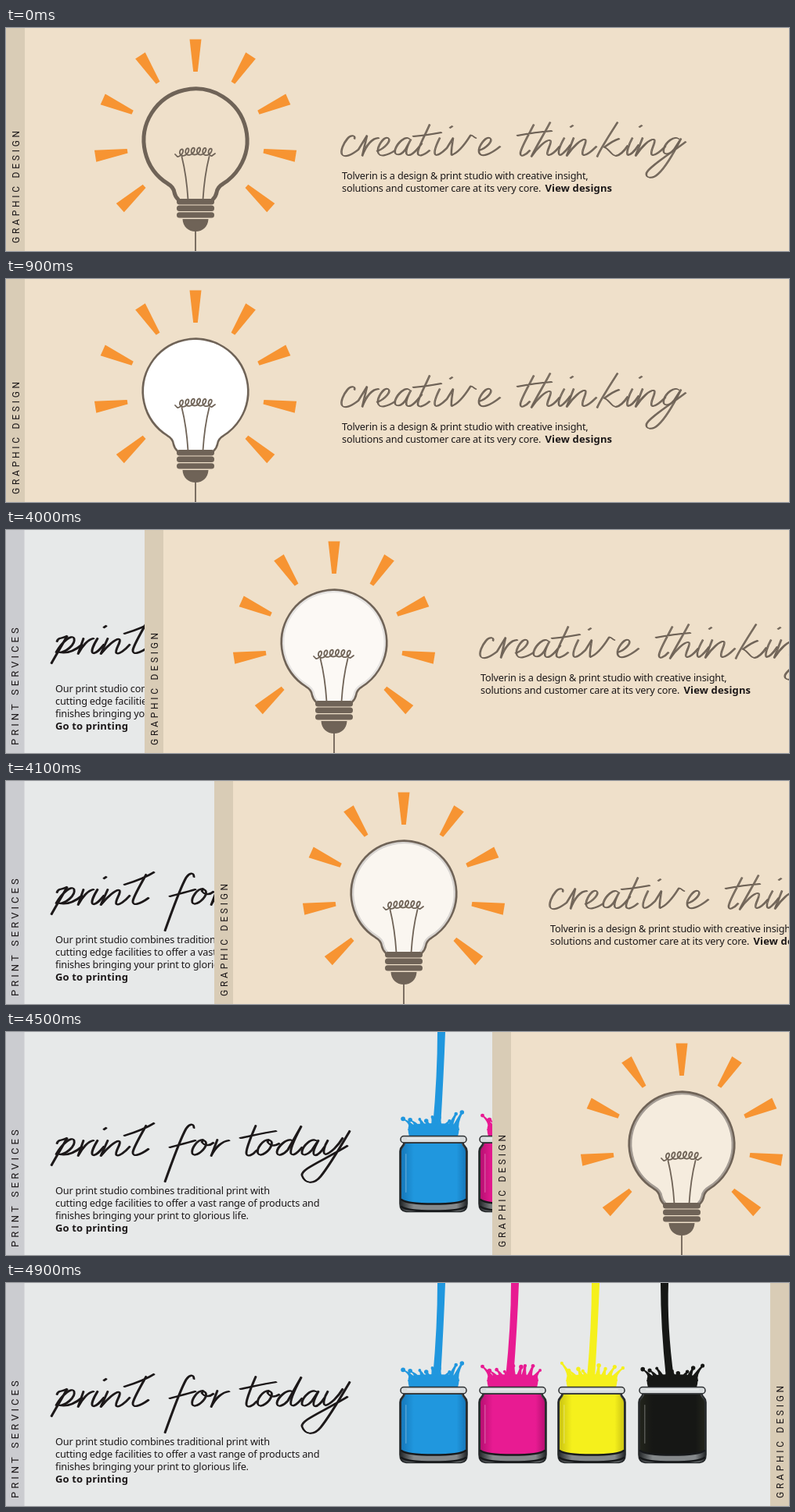
Recreate the animation shown at these times as an HTML page with a canvas. Size 1000 by 286 pixels, loop 8000 ms.

```html
<!DOCTYPE html>
<html lang="en">
<head>
<meta charset="utf-8">
<title>Studio banner</title>
<style>
  html, body { margin: 0; width: 100%; height: 100%; overflow: hidden; background: #e7e9e9; }
  canvas { display: block; width: 1000px; height: 286px; }
</style>
</head>
<body>
<canvas id="stage"></canvas>
<script>
const W = 1000, H = 286, LOOP = 8000, STEP = 100;
const SLIDE = 976, SLIDE_STEPS = 11;
const BROWN = '#6f6357', INK = '#1b1718', ORANGE = '#f79432';

const canvas = document.getElementById('stage');
const ctx = canvas.getContext('2d');
const scale = window.devicePixelRatio || 1;
canvas.width = W * scale;
canvas.height = H * scale;

// Pen strokes of the handwritten headings
const creative = new Path2D(`M445 142C447 137 440 137 436 142C431 148 427 157 429 162C432 167 441 163 450 156
  L461 138L455 164C460 150 468 141 476 141M474 158C484 154 493 144 488 141C482 139 474 152 475 159C476 167 488 163 497 157
  M515 142C510 138 500 147 497 156C495 165 504 164 510 156L517 143C512 152 509 161 513 163C518 164 526 155 531 148
  M541 124C535 138 527 152 526 159C525 167 534 163 541 157M520 139C533 138 545 136 556 134
  M554 141C550 149 546 158 548 162C550 165 557 160 563 154L571 141C570 149 568 159 569 163C578 160 588 146 593 138C595 136 597 140 600 141
  M567 128L570 126M604 157C614 154 623 144 618 141C612 139 603 152 604 159C606 168 620 161 631 152`);
const thinking = new Path2D(`M674 124C666 140 658 153 657 160C656 167 664 163 669 157M653 138C668 135 682 133 697 132
  M695 121C686 138 675 156 671 165C678 154 690 143 695 144C699 146 688 160 692 163C696 164 702 158 707 152
  M713 141C708 150 704 160 707 163C711 163 716 156 721 150M721 127L724 125
  M725 141L716 164C724 152 735 142 740 143C743 146 733 159 737 163C741 164 748 158 754 152`);
const thinkingEnd = new Path2D(`M781 121C771 137 759 155 755 165M783 142C776 144 768 150 764 153C770 154 773 164 779 164C785 163 790 157 794 151
  M800 141C795 150 792 160 794 163C799 163 804 156 808 150M809 127L812 125
  M813 141L804 164C812 152 822 142 828 143C831 146 821 159 825 163C829 164 836 158 842 152
  M859 142C853 138 843 146 840 155C838 164 847 163 853 156L862 142C853 160 843 178 833 187C826 194 816 193 818 186C821 178 850 160 868 146`);
const printFor = new Path2D(`M65 143C67 137 71 140 78 136C72 147 64 160 58 171M64 157C72 143 84 133 87 139C89 147 76 157 68 157C79 159 90 153 97 147
  M99 139L92 159C97 149 105 140 112 139M117 139C112 147 108 156 111 158C115 159 120 153 125 147M125 125L128 123
  M130 139L121 159C129 149 140 139 145 140C148 143 138 154 141 158C144 160 152 154 158 147
  M179 120C171 134 163 148 162 154C161 161 171 158 182 150M151 133C164 129 178 124 189 117`);
const printForEnd = new Path2D(`M240 123C240 117 235 117 230 124C222 138 212 167 203 192M209 148C220 145 232 142 242 139
  M252 138C244 138 236 150 238 156C241 161 252 153 255 146C257 140 252 137 250 141C254 147 260 146 265 142M270 138L262 159C267 148 276 140 285 139`);
const today = new Path2D(`M319 120C313 134 306 150 307 156C308 161 315 158 320 152M299 136C314 133 330 129 345 127
  M336 138C328 138 319 150 322 156C326 161 337 152 339 145C341 139 335 137 334 141C338 147 344 146 349 143
  M366 139C358 136 347 147 346 154C346 161 355 157 360 151L377 121C369 136 362 151 364 156C367 160 373 154 378 148
  M396 139C390 136 380 145 378 153C377 161 386 157 391 151L399 139C394 148 391 156 394 158C398 159 403 153 407 147
  M411 139C406 147 404 156 408 157C415 155 424 146 430 136M439 127C429 144 414 170 402 185C393 196 382 195 378 184C376 176 405 165 436 146`);

const glass = new Path2D(`M-38 142C-38 147 -43 146 -43 153L-43 220Q-43 230 -35 230.5L35 230.5Q43 230 43 220L43 153C43 146 38 147 38 142Z`);
const paint = new Path2D(`M-36 143L36 143C37 148 41 148 41 154L41 214Q34 220 0 220Q-34 220 -41 214L-41 154C-41 148 -37 148 -36 143Z`);

// Bulb outline, relative to its centre
const bulb = new Path2D();
const neck = Math.atan2(56, 35);
bulb.moveTo(-22, 76);
bulb.quadraticCurveTo(-26, 72, -27, 67);
bulb.quadraticCurveTo(-28, 60, -35, 56);
bulb.arc(0, 0, 66, Math.PI - neck, neck);
bulb.quadraticCurveTo(28, 60, 27, 67);
bulb.quadraticCurveTo(26, 72, 22, 76);

const clamp = (v, lo, hi) => Math.min(hi, Math.max(lo, v));
const stepsSince = (t, start, max) => clamp(Math.floor((t - start) / STEP) + 1, 0, max);

function rect(x, y, w, h, color, r = 0) {
  ctx.fillStyle = color;
  ctx.beginPath();
  ctx.roundRect(x, y, w, h, r);
  ctx.fill();
}

function text(str, x, y, font, spacing) {
  ctx.font = font;
  ctx.letterSpacing = spacing + 'px';
  ctx.fillStyle = INK;
  ctx.fillText(str, x, y);
}

const body = (str, x, y) => text(str, x, y, '12.7px "Noto Sans", sans-serif', -0.18);
const bold = (str, x, y) => text(str, x, y, 'bold 13px "Noto Sans", sans-serif', 0.15);

function tab(label, width, color, baseline, size, spacing) {
  rect(0, 0, width, H, color);
  ctx.save();
  ctx.translate(baseline, 276);
  ctx.rotate(-Math.PI / 2);
  text(label, 0, 0, size + 'px Roboto, sans-serif', spacing);
  ctx.restore();
}

// Two shifted passes give a broad-nib line
function handwrite(paths, color, width) {
  ctx.strokeStyle = color;
  ctx.lineWidth = width;
  for (const shift of [-0.6, 0.6]) {
    ctx.save();
    ctx.translate(shift, shift * 0.4);
    paths.forEach(p => ctx.stroke(p));
    ctx.restore();
  }
}

function drawRays() {
  ctx.fillStyle = ORANGE;
  for (let k = -4; k <= 4; k++) {
    ctx.save();
    ctx.rotate(k * 33 * Math.PI / 180);
    ctx.beginPath();
    ctx.moveTo(-7.5, -129.5);
    ctx.lineTo(7.5, -129.5);
    ctx.lineTo(2.8, -88);
    ctx.lineTo(-2.8, -88);
    ctx.fill();
    ctx.restore();
  }
}

function drawFilament() {
  ctx.lineWidth = 1.8;
  ctx.beginPath();
  for (const s of [-1, 1]) {
    ctx.moveTo(s * 17.5, 21);
    ctx.quadraticCurveTo(s * 11.5, 45, s * 9.5, 76);
  }
  // Cursive loops along a gentle arch
  const loops = 6, n = 180;
  ctx.moveTo(-26, 18);
  for (let i = 0; i <= n; i++) {
    const u = i / n, a = u * loops * 2 * Math.PI;
    const lift = 4.5 * Math.cos(a);
    const x = -22 + 44 * u + 3.6 * Math.sin(a) - 0.25 * lift;
    const y = 16.5 - 2 * Math.sin(Math.PI * u) - u + lift;
    ctx.lineTo(x, y);
  }
  ctx.lineTo(25, 17);
  ctx.stroke();
}

function drawBulb(light) {
  ctx.save();
  ctx.translate(242, 144);
  drawRays();
  ctx.strokeStyle = BROWN;
  ctx.lineWidth = 5;
  ctx.stroke(bulb);
  ctx.fillStyle = `rgba(255,255,255,${light})`;
  ctx.fill(bulb);
  drawFilament();
  for (let i = 0; i < 3; i++) rect(-24, 75 + i * 8.6, 48, 7.4, BROWN, 3.5);
  ctx.fillStyle = BROWN;
  ctx.beginPath();
  ctx.moveTo(-16.5, 101);
  ctx.lineTo(16.5, 101);
  ctx.bezierCurveTo(16, 111, 9, 117, 0, 117);
  ctx.bezierCurveTo(-9, 117, -16, 111, -16.5, 101);
  ctx.fill();
  rect(-0.9, 116, 1.8, 28, BROWN);
  ctx.restore();
}

function random(seed) {
  return () => (seed = (seed * 16807) % 2147483647) / 2147483647;
}

function drawSplash(seed) {
  const rnd = random(seed * 7919);
  ctx.beginPath();
  ctx.moveTo(-31, 134);
  ctx.quadraticCurveTo(-34, 124, -31, 119);
  ctx.quadraticCurveTo(0, 115, 31, 119);
  ctx.quadraticCurveTo(34, 124, 31, 134);
  ctx.fill();
  for (let f = -1; f <= 1; f += 0.25) {
    const x = f * 27, tipX = f * 37 + rnd() * 6 - 3;
    const tipY = 111 - Math.abs(f) * 5 + rnd() * 12 - 6;
    ctx.beginPath();
    ctx.moveTo(x - 6, 126);
    ctx.quadraticCurveTo(x - 1, 118, tipX - 1.4, tipY);
    ctx.lineTo(tipX + 1.4, tipY);
    ctx.quadraticCurveTo(x + 3, 118, x + 6, 126);
    ctx.fill();
    ctx.beginPath();
    ctx.arc(tipX, tipY, 1.8 + rnd() * 1.2, 0, 2 * Math.PI);
    ctx.fill();
  }
}

function drawStream(top, foot) {
  ctx.beginPath();
  ctx.moveTo(top - 5, 0);
  ctx.quadraticCurveTo(top - 5, 55, foot - 5, 122);
  ctx.lineTo(foot + 5, 122);
  ctx.quadraticCurveTo(top + 3, 55, top + 5, 0);
  ctx.fill();
}

function sideGradient(edge, middle) {
  const g = ctx.createLinearGradient(-42, 0, 42, 0);
  g.addColorStop(0, edge);
  g.addColorStop(0.2, middle);
  g.addColorStop(0.85, middle);
  g.addColorStop(1, edge);
  return g;
}

function drawJar({ x, color, shade, top, foot }, i) {
  ctx.save();
  ctx.translate(x, 0);
  ctx.fillStyle = color;
  drawStream(top, foot);
  drawSplash(i + 3);

  ctx.fillStyle = sideGradient('#26292b', '#85898b');
  ctx.fill(glass);
  ctx.fillStyle = sideGradient(shade, color);
  ctx.fill(paint);
  ctx.strokeStyle = '#25282a';
  ctx.lineWidth = 1.6;
  ctx.stroke(glass);

  // Dark rings of the thick base
  ctx.strokeStyle = '#17191b';
  ctx.lineWidth = 2.4;
  ctx.beginPath();
  for (const y of [215, 224]) {
    ctx.moveTo(-41, y);
    ctx.quadraticCurveTo(-34, y + 5.5, 0, y + 5.5);
    ctx.quadraticCurveTo(34, y + 5.5, 41, y);
  }
  ctx.stroke();

  // Clear rim
  rect(-42, 133.5, 84, 8.5, 'rgba(205,210,212,.55)', 4);
  ctx.strokeStyle = '#2b2e30';
  ctx.lineWidth = 1.5;
  ctx.stroke();
  rect(-34, 136, 68, 1.5, 'rgba(255,255,255,.45)', 1);
  rect(-36, 156, 1.5, 50, 'rgba(255,255,255,.25)', 1);
  ctx.restore();
}

const jars = [
  { x: 546, color: '#2097de', shade: '#1676b8', top: 10, foot: 4 },
  { x: 647, color: '#e81b92', shade: '#b40f70', top: 3, foot: -4 },
  { x: 748, color: '#f5f01c', shade: '#c9c212', top: 5, foot: -1 },
  { x: 851, color: '#161715', shade: '#23251c', top: -10, foot: -3 }
];

function drawPrint() {
  rect(0, 0, W, H, '#e7e9e9');
  tab('PRINT SERVICES', 23.5, '#cbccd0', 16, 13, 4.04);
  handwrite([printFor, printForEnd, today], INK, 1.7);
  body('Our print studio combines traditional print with', 63, 207.5);
  body('cutting edge facilities to offer a vast range of products and', 63, 223.5);
  body('finishes bringing your print to glorious life.', 63, 239.5);
  bold('Go to printing', 63, 255.5);
  jars.forEach(drawJar);
}

function drawGraphic(x, light) {
  ctx.save();
  ctx.translate(x, 0);
  rect(0, 0, W, H, '#efe0ca');
  tab('GRAPHIC DESIGN', 24, '#d9ccb6', 17.3, 12, 3.75);
  drawBulb(light);
  handwrite([creative, thinking, thinkingEnd], BROWN, 1.4);
  body('Tolverin is a design & print studio with creative insight,', 429, 193.5);
  body('solutions and customer care at its very core.', 429, 209.5);
  bold('View designs', 688.5, 209.5);
  ctx.restore();
}

function render(now) {
  const t = now % LOOP;
  const slide = stepsSince(t, 3900, SLIDE_STEPS) / SLIDE_STEPS;
  const light = stepsSince(t, 500, 5) / 5 * (1 - slide);
  ctx.setTransform(scale, 0, 0, scale, 0, 0);
  ctx.lineCap = ctx.lineJoin = 'round';
  if (slide > 0) drawPrint();
  drawGraphic(Math.round(slide * SLIDE), light);
}

const start = performance.now();
function loop() {
  render(performance.now() - start);
  requestAnimationFrame(loop);
}
loop();
</script>
</body>
</html>
```
